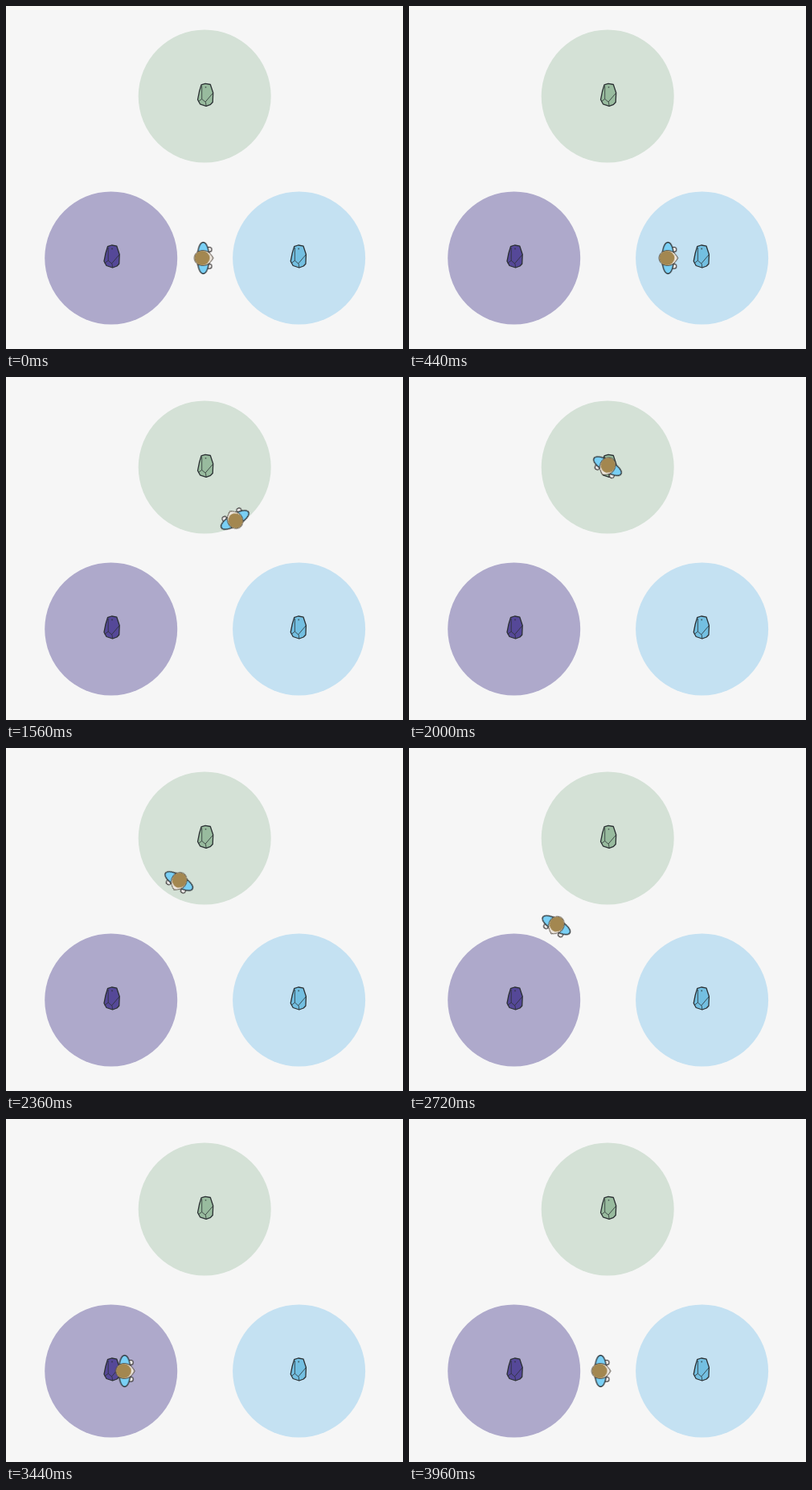
Write an HTML page that moves like this. It is 494 by 426 pixels and loops after 4 s.

```html
<!DOCTYPE html>
<html lang="en">
<head>
<meta charset="utf-8">
<title>Walking between crystals</title>
<style>
  html, body { margin: 0; width: 100%; height: 100%; overflow: hidden; background: #f6f6f6; }
  svg { display: block; width: 494px; height: 426px; }
  .outline { stroke: #2b3033; stroke-width: 1.3; stroke-linejoin: round; }
  .facet { fill: none; stroke: #2b3033; stroke-width: .8; stroke-linejoin: round; }
</style>
</head>
<body>
<svg viewBox="0 0 494 426">
  <defs>
    <g id="gem">
      <path class="outline" d="M-5.5-12.4-.5-14 5.8-12.8 9.2-2.5 8.7 9.2 6 12 .6 14-7 11.5-10 6-8-4Z"/>
      <path class="facet" d="M-4.8-11V5.2L-9.3 8.5M-4.8 5.2 0 9.3.6 14M-.4 8.8 9-2.2"/>
      <circle cy="-9.5" r=".9" fill="#2b3033" opacity=".7"/>
    </g>
  </defs>
  <circle cx="247.2" cy="112" r="82.5" fill="#d4e1d6"/>
  <circle cx="130.7" cy="313" r="82.5" fill="#aea9cb"/>
  <circle cx="364.6" cy="313" r="82.5" fill="#c4e1f2"/>
  <use href="#gem" x="248.5" y="110.3" fill="#98bb9e"/>
  <use href="#gem" x="132" y="311" fill="#554898"/>
  <use href="#gem" x="364.2" y="311" fill="#73bfe1"/>
  <g id="walker">
    <g fill="#f3f1ef" stroke="#393535" stroke-width="1.1">
      <circle cx="7.6" cy="-10.5" r="3"/>
      <circle cx="7.6" cy="10.3" r="3"/>
    </g>
    <ellipse class="outline" rx="7.5" ry="19.5" fill="#7ad0f5"/>
    <path d="M12.4 0C8.5 7 5 9.3-.5 9.3-7 9.3-11 5-11 0S-7-9.3-.5-9.3C5-9.3 8.5-7 12.4 0Z"
          fill="#eee7df" stroke="#40362a" stroke-width="1"/>
    <ellipse cx="-1.2" rx="9.4" ry="8.9" fill="#a38750"/>
  </g>
</svg>
<script>
  const LOOP = 4000, STEP = 40;
  const corners = [[129, 313], [361.8, 313], [247, 110.7]];
  const headings = [0, -120, 120];

  // Each side takes a third of the loop; the walk starts halfway along the base.
  function poseAt(time) {
    const progress = time / LOOP * 3 + 0.5;
    const side = Math.floor(progress) % 3;
    const k = progress % 1;
    const from = corners[side], to = corners[(side + 1) % 3];
    const [x, y] = from.map((v, axis) => v + (to[axis] - v) * k);
    return `translate(${x}px, ${y}px) rotate(${headings[side]}deg)`;
  }

  const frames = Array.from({ length: LOOP / STEP + 1 }, (_, i) => ({
    offset: i * STEP / LOOP,
    transform: poseAt(i * STEP),
    easing: "step-end"
  }));

  document.getElementById("walker").animate(frames, { duration: LOOP, iterations: Infinity });
</script>
</body>
</html>
```
